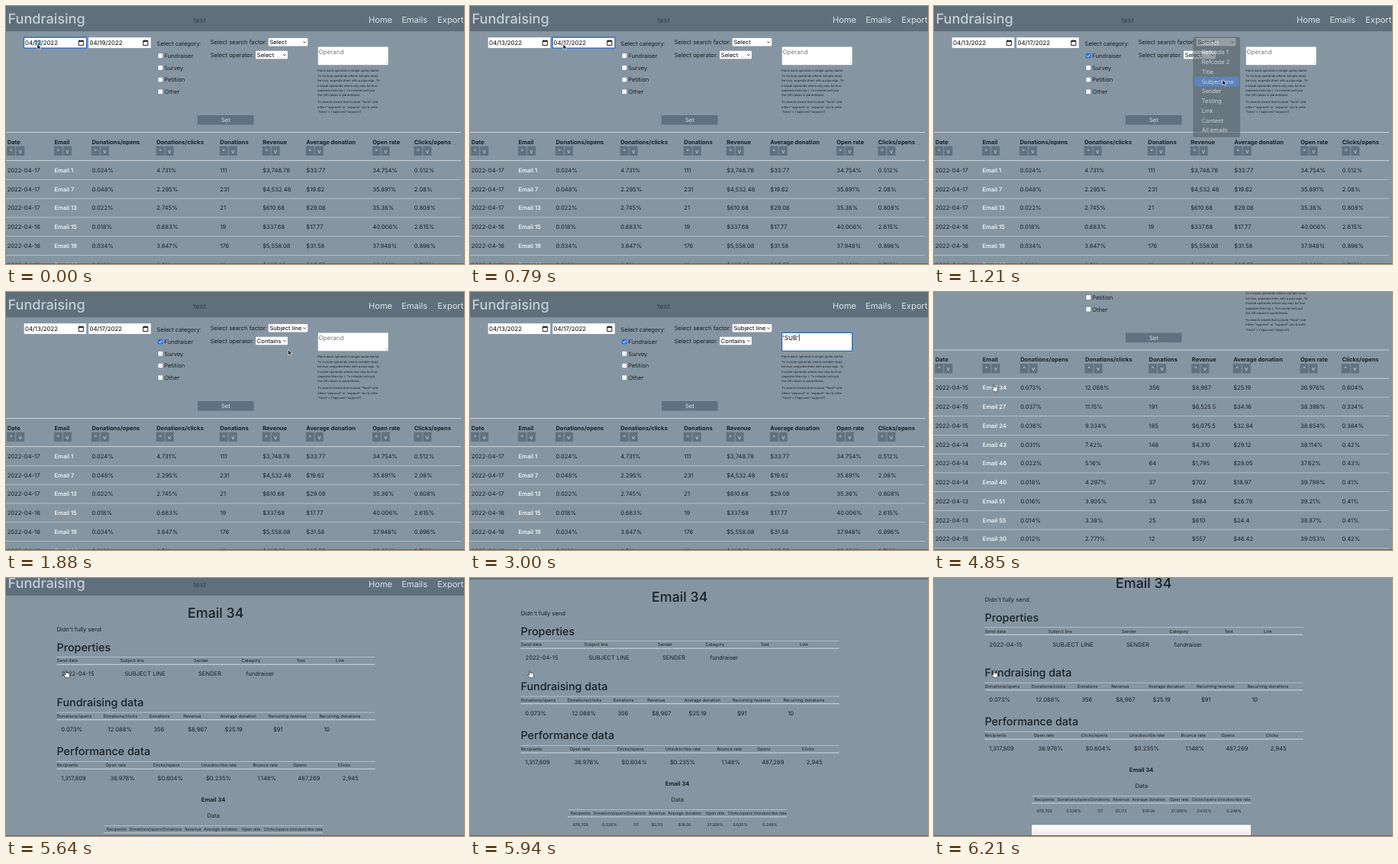
An HTML page for the animation above (6.45 s loop, 600 by 338 pixels).

```html
<!DOCTYPE html>
<html lang="en">
<head>
<meta charset="utf-8">
<title>Fundraising report</title>
<style>
html, body { margin: 0; width: 100%; height: 100%; overflow: hidden; background: #8596a2; }
svg { display: block; width: 600px; height: 338px; }
text { font-family: Inter, "Open Sans", sans-serif; text-rendering: geometricPrecision; }
</style>
</head>
<body>
<svg id="stage" viewBox="0 0 600 338"></svg>
<script>
const LOOP = 6450;
const INK = '#1a2025', PALE = '#dbe0e4', BUTTON = '#607280', RING = '#3069bd';
const SHIFT = 31.5; // room taken by the notice above the form

// y is the middle of the capital letters
const text = (x, y, s, o = {}) => {
  const { size = 7.6, fill = INK, weight = 400, anchor = 'start', id } = o;
  return `<text ${id ? `id="${id}"` : ''} x="${x}" y="${y + size * .362}" font-size="${size}" ` +
    `fill="${fill}" font-weight="${weight}" text-anchor="${anchor}">${s}</text>`;
};
const rect = (x, y, w, h, fill, extra = '') =>
  `<rect x="${x}" y="${y}" width="${w}" height="${h}" fill="${fill}" ${extra}/>`;
const rule = (x1, x2, y, w = .7, color = '#c6cfd5') =>
  rect(x1, y - w / 2, x2 - x1, w, color);
const group = (id, body) => `<g id="${id}">${body}</g>`;
const split = s => s.split('|');
const bold = { size: 7.5, weight: 700 };
const mid = { anchor: 'middle' };

function dateField(id, x, value) {
  return rect(x, 41.2, 81.5, 13.8, '#fff') +
    rect(x - .2, 41, 82, 14.2, 'none', `id="${id}Ring" stroke="${RING}" stroke-width="1.3" rx="1"`) +
    rect(x + 13.6, 44, 9, 8.8, '#a9cdf6', `id="${id}Mark"`) +
    text(x + 1.3, 48.2, value, { id, size: 7.85, fill: '#000' }) +
    `<path d="M${x + 71.5} 45.5h6.2v6h-6.2zM${x + 71.5} 46.6h6.2M${x + 73} 44.2v1.4M${x + 76.2} 44.2v1.4"
      fill="none" stroke="#222" stroke-width="1"/>`;
}

function selectBox(id, x, y, w) {
  return rect(x, y - 5.2, w, 10.4, '#fff', 'rx="1"') +
    text(x + 1.6, y, 'Select', { id, fill: '#000' }) +
    `<path d="M${x + w - 6} ${y - .9}l1.8 1.9l1.8 -1.9" fill="none" stroke="#222" stroke-width=".8"/>`;
}

function checkBox(y, label, on) {
  const box = rect(199.2, y - 3.2, 6.2, 6.2, '#fff', 'rx="1" stroke="#7c868d" stroke-width=".5"');
  const tick = on ? group('tick', rect(199, y - 3.4, 6.6, 6.6, '#2a6fe0', 'rx="1.2"') +
    `<path d="M200.5 ${y}l1.4 1.6l2.3 -3.4" fill="none" stroke="#fff" stroke-width="1"/>`) : '';
  return box + tick + text(207.3, y, label);
}

function menu(id, x, y, w, items, pick) {
  const step = 12.75;
  return group(id, rect(x, y, w, items.length * step + 4, '#57636b', 'rx="3"') +
    rect(x + 2, y + 1.3 + pick * step, w - 4, step, '#4478d4', `rx="2" id="${id}Pick"`) +
    items.map((s, i) => text(x + 11.5, y + 7.5 + i * step, s, { fill: '#f2f4f5' })).join(''));
}

const COLS = split('Date|Email|Donations/opens|Donations/clicks|Donations|Revenue|Average donation|Open rate|Clicks/opens');

function table(id, xs, rows) {
  let s = rule(0, 596, 165.5, .9, '#d3dade') + rule(0, 596, 202.6, .9, '#d3dade');
  COLS.forEach((c, i) => {
    const x = xs[i];
    s += text(x, 177.8, c, bold);
    ['^', 'v'].forEach((g, k) => {
      s += rect(x - .5 + k * 12, 183.6, 11, 12.4, BUTTON, `id="${id}${g}${i}"`) +
        text(x + 5 + k * 12, 189.8, g, { fill: PALE, ...mid });
    });
  });
  rows.forEach((row, r) => {
    const y = 215.2 + r * 24.75;
    row.forEach((v, i) => s += text(xs[i], y, v, i === 1 ? { fill: '#fff', weight: 500 } : {}));
    s += rule(0, 596, y + 12.2);
  });
  return group(id, s);
}

const before = [
  '2022-04-17|Email 1|0.024%|4.731%|111|$3,748.78|$33.77|34.754%|0.512%',
  '2022-04-17|Email 7|0.048%|2.295%|231|$4,532.48|$19.62|35.891%|2.08%',
  '2022-04-17|Email 13|0.022%|2.745%|21|$610.68|$29.08|35.36%|0.808%',
  '2022-04-16|Email 15|0.018%|0.683%|19|$337.68|$17.77|40.006%|2.615%',
  '2022-04-16|Email 19|0.034%|3.847%|176|$5,558.08|$31.58|37.948%|0.896%',
  '2022-04-16|Email 20|0.018%|0.5%|18|$425.36|$25.55|39.281%|2.719%'
].map(split);
const found = [
  '2022-04-15|Email 24|0.036%|9.334%|185|$6,075.5|$32.84|38.654%|0.384%',
  '2022-04-15|Email 27|0.037%|11.15%|191|$6,525.5|$34.16|38.398%|0.334%',
  '2022-04-15|Email 30|0.012%|2.771%|12|$557|$46.42|39.053%|0.42%',
  '2022-04-15|Email 34|0.073%|12.088%|356|$8,967|$25.19|36.976%|0.604%',
  '2022-04-14|Email 40|0.018%|4.297%|37|$702|$18.97|39.799%|0.41%',
  '2022-04-14|Email 43|0.031%|7.42%|148|$4,310|$29.12|38.114%|0.42%',
  '2022-04-14|Email 46|0.022%|5.16%|64|$1,795|$28.05|37.62%|0.43%',
  '2022-04-13|Email 51|0.016%|3.905%|33|$884|$26.79|39.21%|0.41%',
  '2022-04-13|Email 55|0.014%|3.38%|25|$610|$24.4|38.87%|0.41%'
].map(split);
const sorted = [...found].sort((a, b) => parseFloat(b[2]) - parseFloat(a[2]));
const oldX = [1.7, 63.4, 112.4, 197.2, 280.3, 336.2, 393.3, 480.3, 534.8];
const newX = [1.7, 63.8, 113.2, 198, 281.6, 337.8, 392.2, 480, 534.4];

const hints = [
  [85, 'Place each operand in single quote marks.|To include operands where multiple must|be true, separate them with a plus sign. To|include operands where any may be true|separate them by /. To include both put|the OR clause in parenthesis.'],
  [126, 'To search emails that include "Tavol" and|either "approve" or "support" you\'d write|\'Tavol\' + (\'approve\'/\'support\')']
];

const form =
  dateField('from', 23.7, '04/12/2022') + dateField('to', 108.2, '04/19/2022') +
  text(197.3, 49.4, 'Select category:') +
  checkBox(65.2, 'Fundraiser', true) + checkBox(80.9, 'Survey') +
  checkBox(96.6, 'Petition') + checkBox(112.3, 'Other') +
  text(267.7, 47.5, 'Select search factor:') + selectBox('factor', 343.8, 47.3, 51.5) +
  text(267.7, 64, 'Select operator:') + selectBox('operator', 327.2, 64, 41.8) +
  rect(408.8, 53.5, 91.8, 23.7, '#fff') +
  '<path d="M496.5 76l3 -3M498.3 76l1.2 -1.2" stroke="#999" stroke-width=".5"/>' +
  rect(408.6, 53.3, 92.2, 24.1, 'none', `id="areaRing" stroke="${RING}" stroke-width="1.3" rx="1"`) +
  text(409.4, 59.6, 'Operand', { id: 'operand', size: 8.1 }) +
  rect(0, 55, .7, 9, '#111', 'id="caret"') +
  hints.map(([y, s]) => split(s).map((l, i) =>
    text(408.3, y + i * 6.4, l, { size: 4.05 })).join('')).join('') +
  rect(251, 143, 73.6, 12.6, BUTTON, 'id="set"') +
  text(287.8, 149.3, 'Set', { fill: PALE, ...mid });

function block(title, y, heads, hx, values, vx) {
  return text(66.5, y, title, { size: 14.3, weight: 500 }) +
    rule(66.5, 483.5, y + 13.2) + rule(66.5, 483.5, y + 22.8, 1, '#d3dade') +
    split(heads).map((h, i) => text(hx[i], y + 18, h, { size: 5.7 })).join('') +
    split(values).map((v, i) => text(vx[i], y + 35.3, v)).join('');
}

const miniHeads = split('Recipients|Donations/opens|Donations|Revenue|Average donation|Open rate|Clicks/opens|Unsubscribe rate');
const miniValues = split('876,709|0.036%|117|$2,113|$18.06|37.306%|0.625%|0.249%');
const miniX = [144.8, 183, 217.5, 245, 281.3, 321, 354, 393];

const detail =
  text(274.8, 56, 'Email 34', { size: 17.9, weight: 500, ...mid }) +
  text(66.5, 77, "Didn't fully send") +
  block('Properties', 100.5, 'Send date|Subject line|Sender|Category|Test|Link',
    [66.5, 149.5, 246, 308.5, 380.5, 432], '2022-04-15|SUBJECT LINE|SENDER|fundraiser',
    [72.5, 155.2, 252, 314.5]) +
  block('Fundraising data', 173,
    'Donations/opens|Donations/clicks|Donations|Revenue|Average donation|Recurring revenue|Recurring donations',
    [66.5, 127.7, 187.5, 232.3, 280.8, 344, 410.4], '0.073%|12.088%|356|$8,967|$25.19|$91|10',
    [72.3, 133.6, 193.4, 238.2, 286.6, 350, 416.2]) +
  block('Performance data', 237.3,
    'Recipients|Open rate|Clicks/opens|Unsubscribe rate|Bounce rate|Opens|Clicks',
    [66.5, 130.6, 192.6, 256, 323.4, 376.2, 434.8],
    '1,317,809|36.976%|$0.604%|$0.235%|1.148%|487,269|2,945',
    [72.3, 136.6, 198.6, 262, 329.2, 382.2, 440.8]) +
  text(271.6, 300.6, 'Email 34', { ...bold, ...mid }) +
  text(271.8, 321.2, 'Data', mid) +
  rule(128, 415, 334.8) + rule(128, 415, 344, .9, '#d3dade') +
  miniX.map((x, i) => text(x, 339.3, miniHeads[i], { size: 5.3, ...mid }) +
    text(x, 354, miniValues[i], { size: 5.2, ...mid })).join('') +
  rect(128, 372.5, 287, 60, 'url(#sheet)');

const header = rect(0, 0, 600, 33.2, '#5f707c') +
  text(2.5, 16.6, 'Fundraising', { size: 18.1, weight: 500, fill: '#c6ced4' }) +
  text(253.6, 19, 'test', { size: 9.3, fill: '#36424b', ...mid }) +
  ['Home', 'Emails', 'Export'].map((s, i) =>
    text([475, 518.2, 565.2][i], 18.2, s, { size: 11.1, fill: '#dde2e6' })).join('');

const notice = ['Not what you were looking for? Make sure your operand syntax',
  'was correct. Here are your operands: [SUB]']
  .map((s, i) => text(369, 46.6 + i * 12.1, s, { ...bold, ...mid })).join('');

const outline = 'stroke-linejoin="round" stroke-linecap="round"';
const pointers =
  `<path id="arrow" d="M0 0v6.8l1.6 -1.4l1.1 2.5l1.2 -.5l-1.1 -2.5h2.2z" fill="#111" stroke="#fff" stroke-width=".6" ${outline}/>` +
  `<path id="hand" transform="scale(1.12)" d="M-.6 .6q.6 -1 1.2 0v2.6q1 -.8 1.4 .2q1 -.6 1.4 .3q1.1 -.3 1.2 .7v1.6q-.2 1.5 -1 2.6h-3.6q-1.2 -1.7 -2.5 -3.4q.1 -1 1.9 0z" fill="#fff" stroke="#222" stroke-width=".6" ${outline}/>` +
  `<path id="beam" d="M-1.2 -3.5q1.2 0 1.2 1v5q0 1 -1.2 1M1.2 -3.5q-1.2 0 -1.2 1v5q0 1 1.2 1" fill="none" stroke="#222" stroke-width=".6"/>`;

document.getElementById('stage').innerHTML =
  '<defs><linearGradient id="sheet" x2="0" y2="1"><stop stop-color="#fff"/>' +
  '<stop offset=".25" stop-color="#ece7e5"/></linearGradient></defs>' +
  rect(0, 0, 600, 338, '#8596a2') +
  group('page',
    group('list', group('notice', notice) + group('body', form +
      table('old', oldX, before) + table('hits', newX, found) + table('best', newX, sorted))) +
    group('detail', detail) + header) +
  menu('factorMenu', 339.3, 40.4, 61.8,
    split('Select|Refcode 1|Refcode 2|Title|Subject line|Sender|Testing|Link|Content|All emails'), 4) +
  menu('operatorMenu', 322.7, 57, 54, split('Select|Contains|Equals|Excludes'), 1) +
  rect(0, 337, 600, 1, '#5c6b76') +
  group('pointer', pointers);

const el = {};
document.querySelectorAll('[id]').forEach(n => el[n.id] = n);

// last value whose start time has passed
const step = (track, t) => track.reduce((v, k) => k[0] <= t ? k[1] : v, track[0][1]);

// eased value between keys
function glide(track, t, col = 1, ease = u => u * u * (3 - 2 * u)) {
  const i = track.findIndex(k => k[0] > t);
  if (i === 0) return track[0][col];
  if (i < 0) return track[track.length - 1][col];
  const a = track[i - 1], b = track[i];
  return a[col] + (b[col] - a[col]) * ease((t - a[0]) / (b[0] - a[0]));
}
const linear = u => u;

const path = [
  [0, 41, 50], [390, 41, 50], [600, 122, 50], [940, 122, 50], [1030, 202, 65], [1060, 202, 65],
  [1125, 374, 48], [1140, 374, 48], [1200, 378, 97], [1260, 378, 97], [1450, 350, 64],
  [1600, 350, 64], [1710, 352, 78], [1800, 352, 78], [2100, 450, 66], [3210, 450, 66],
  [3390, 296, 149], [3450, 290, 150], [3610, 205, 168], [3760, 205, 168], [3980, 129, 199],
  [4480, 129, 199], [4790, 78.3, 121]
];
const shape = [[0, 'arrow'], [60, ''], [390, 'arrow'], [2070, 'beam'], [2520, ''], [3210, 'arrow'],
  [3360, 'hand'], [3510, 'arrow'], [3960, 'hand'], [4540, 'arrow'], [4720, 'hand']];
const view = [[0, 'old'], [3760, 'hits'], [4480, 'best'], [4900, 'detail']];
const listScroll = [[3800, 0], [4060, 22], [4540, 22], [4800, 121]];
const detailScroll = [[5520, 0], [5640, 10], [5940, 31], [6090, 49]];
const fromText = [[0, '04/12/2022'], [30, '04/01/2022'], [90, '04/13/2022']];
const toText = [[0, '04/19/2022'], [690, '04/01/2022'], [750, '04/17/2022']];
const typed = [[0, ''], [2520, "'"], [2550, "'S"], [2610, "'SU"], [2640, "'SUB"], [2790, "'SUB'"]];
const factorText = [[0, 'Select'], [1240, 'Subject line'], [3760, 'Subject']];
const operatorText = [[0, 'Select'], [1800, 'Contains']];
const factorFade = [[1130, 0], [1140, .96], [1180, .96], [1210, .62], [1270, 0]];
const operatorFade = [[1600, 0], [1615, .96], [1770, .96], [1860, 0]];

const show = (name, on) => el[name].style.display = on ? '' : 'none';
const within = (t, a, b) => t >= a && t < b;
const move = (name, x, y) => el[name].setAttribute('transform', `translate(${x} ${y})`);
const write = (name, s) => { if (el[name].textContent !== s) el[name].textContent = s; };

function draw(t) {
  const now = step(view, t), onDetail = now === 'detail', results = t >= 3760;
  show('list', !onDetail);
  show('detail', onDetail);
  show('notice', results);
  ['old', 'hits', 'best'].forEach(n => show(n, n === now));
  move('page', 0, -(onDetail ? glide(detailScroll, t, 1, linear) : glide(listScroll, t)));
  move('body', 0, results ? SHIFT : 0);

  write('from', step(fromText, t));
  write('to', step(toText, t));
  write('factor', step(factorText, t));
  write('operator', step(operatorText, t));
  show('fromRing', t < 630);
  show('fromMark', t < 90);
  show('toRing', within(t, 630, 1045));
  show('toMark', within(t, 630, 750));
  show('tick', t >= 1045);

  const value = step(typed, t), focus = within(t, 2130, 3450);
  write('operand', value || 'Operand');
  el.operand.setAttribute('fill', value ? '#000' : '#757b80');
  show('areaRing', focus);
  show('caret', focus);
  if (focus) el.caret.setAttribute('x', 409.6 + (value ? el.operand.getComputedTextLength() : 0));
  el.set.setAttribute('fill', within(t, 3360, 3510) ? '#6d7e8b' : BUTTON);
  el.hitsv2.setAttribute('fill', t >= 3960 ? '#a3afb7' : BUTTON);

  el.factorMenu.setAttribute('opacity', glide(factorFade, t, 1, linear));
  el.operatorMenu.setAttribute('opacity', glide(operatorFade, t, 1, linear));
  show('factorMenuPick', t >= 1185);
  show('operatorMenuPick', t >= 1680);

  const kind = step(shape, t);
  ['arrow', 'hand', 'beam'].forEach(n => show(n, n === kind));
  move('pointer', glide(path, t), glide(path, t, 2));
}

const start = performance.now();
function run() {
  draw((performance.now() - start) % LOOP);
  requestAnimationFrame(run);
}
draw(0);
requestAnimationFrame(run);
</script>
</body>
</html>
```
